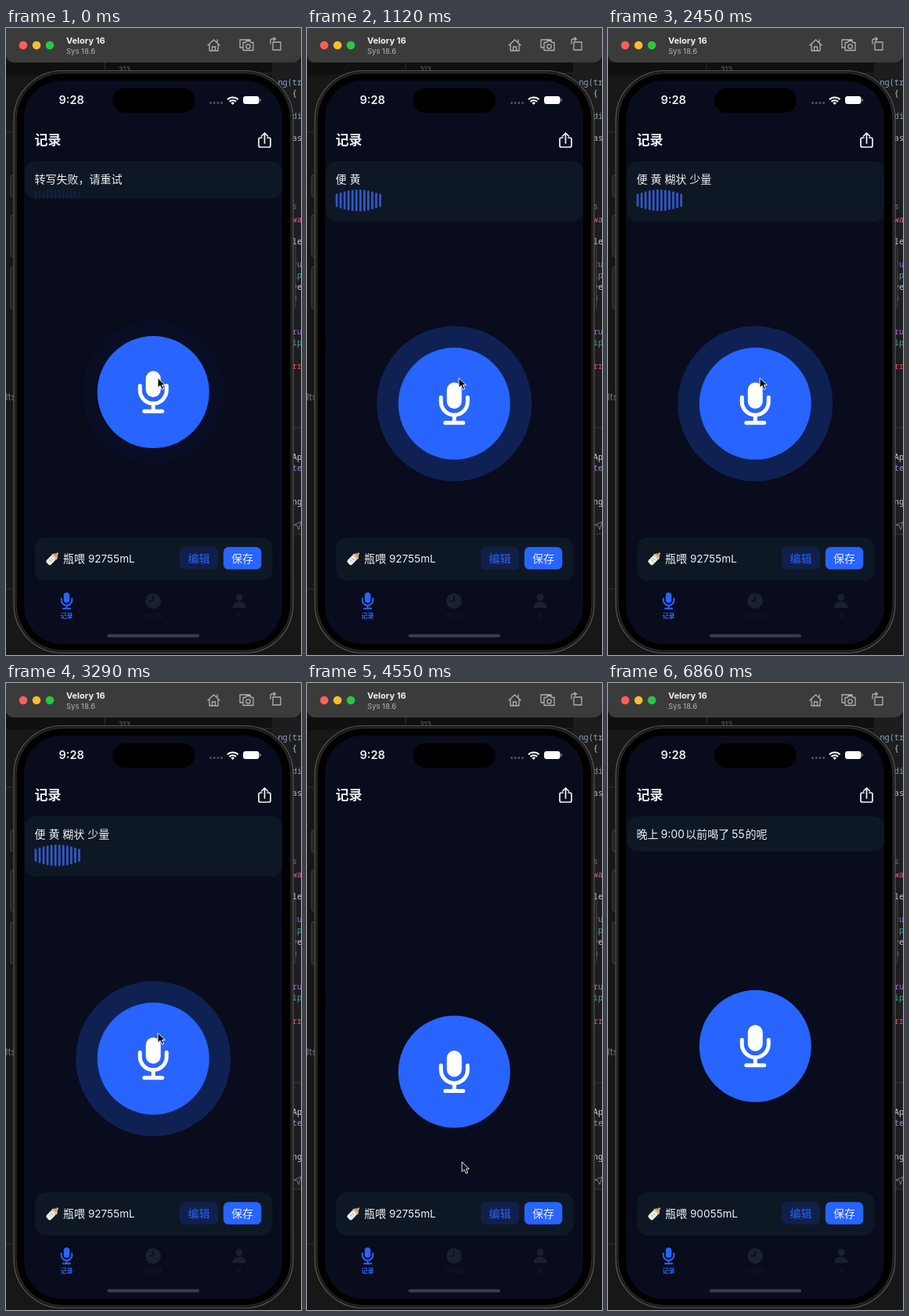
An HTML page that plays this animation: 377 by 800 pixels, repeating every 7000 ms.

```html
<!DOCTYPE html>
<html lang="zh-CN">
<head>
<meta charset="utf-8">
<style>
html, body { margin: 0; width: 100%; height: 100%; overflow: hidden; background: #171717; }
svg { display: block; width: 100vw; height: 100vh; }
text { font-family: Inter, "Noto Sans CJK SC", "Noto Sans CJK", sans-serif; fill: #eef0f5; font-size: 14px; white-space: pre; }
.mid { text-anchor: middle; }
.small { font-size: 8px; }
.amount { font-size: 13.5px; }
#code text { font: 500 10.2px "Noto Sans Mono", monospace; }
.line { fill: none; stroke-linecap: round; stroke-linejoin: round; }
</style>
</head>
<body>
<svg viewBox="0 0 377 800">
  <defs>
    <g id="mic">
      <rect x="-9.5" y="-27" width="19" height="33.5" rx="9.5" stroke="none"/>
      <path class="line" stroke-width="5" d="M-17-8v5.5a17 17 0 0 0 34 0v-5.5M0 15v9M-11.5 24.5h23"/>
    </g>
    <clipPath id="cardClip"><rect id="clipBox" x="23" y="170" width="330" height="48"/></clipPath>
  </defs>

  <!-- desktop -->
  <rect width="377" height="800" fill="#171717"/>
  <rect y="44" width="377" height="16" fill="#101010"/>
  <path d="M126 44v14H377M0 133h12M0 716h12" fill="none" stroke="#303030"/>
  <rect x="340" y="44" width="37" height="602" fill="#1d1d20"/>
  <path d="M350 510h27M350 646h27" stroke="#39393c"/>
  <path class="line" d="M368 634l9-4-3 10-2-5z" stroke="#77777b"/>
  <text x="144" y="56" style="font-size:9px;fill:#66666a">313</text>
  <text x="-.5" y="475" style="font-size:12px;fill:#77777a">lts</text>
  <g id="code"></g>

  <!-- window bar -->
  <path d="M0 0H377V34a10 10 0 0 1-10 10H10A10 10 0 0 1 0 34z" fill="#3b3b3c"/>
  <circle cx="22" cy="22" r="5.3" fill="#ff5f57"/>
  <circle cx="39" cy="22" r="5.3" fill="#febc2e"/>
  <circle cx="56" cy="22" r="5.3" fill="#28c840"/>
  <text x="77" y="20" style="font-size:11px;font-weight:700">Velory 16</text>
  <text x="77" y="33" style="font-size:9.5px;fill:#b1b1b3">Sys 18.6</text>
  <g class="line" stroke="#b0b0b2" stroke-width="1.3">
    <path d="M258 22l7.5-7 7.500 7M260 21v8h11v-8M263.500 29v-5h4v5M270 18v-3"/>
    <path d="M302 25h-3v-10h13v2M303 18.500h3l1.500-2h4l1.500 2h3v10h-13z"/>
    <circle cx="309.5" cy="23.5" r="2.7"/>
    <path d="M341 18h10v10h-10zM338 20v-4q0-2 2-2h4M342 12l2.500 2-2.500 2"/>
  </g>

  <!-- phone body -->
  <g fill="#202020" stroke="#454545">
    <rect x="6" y="188" width="6" height="27" rx="1.5"/>
    <rect x="6" y="239" width="6" height="52" rx="1.5"/>
    <rect x="6" y="305" width="6" height="53" rx="1.5"/>
    <rect x="364" y="277" width="6" height="80" rx="1.5"/>
  </g>
  <rect x="10" y="54.5" width="357" height="743" rx="62" fill="#1b1b1c" stroke="#565656" stroke-width="1.2"/>
  <rect x="13" y="57.5" width="351" height="737" rx="59" fill="#000" stroke="#303030"/>
  <rect x="23" y="67" width="330" height="719" rx="48" fill="#080c1c"/>

  <!-- status bar -->
  <rect x="136" y="77" width="105" height="31" rx="15.5"/>
  <text x="67.5" y="97.3" style="font-size:14.5px;font-weight:600">9:28</text>
  <path d="M261.500 95.500h16" class="line" stroke="#50535f" stroke-width="3" stroke-dasharray="0 4.7"/>
  <path d="M283 91.300a9.500 9.500 0 0 1 13.500 0M285.500 94a6 6 0 0 1 8.500 0" fill="none" stroke="#fff" stroke-width="2.2"/>
  <path d="M289.700 98l-2.300-2.500a3.500 3.500 0 0 1 4.600 0z" fill="#fff"/>
  <rect x="303" y="87" width="20.5" height="10" rx="3.3" fill="#fff"/>
  <path d="M325 90.500q1.500 1.500 0 3z" fill="#888" stroke="#888"/>

  <!-- header -->
  <text x="36.5" y="149" style="font-size:17px;font-weight:700">记录</text>
  <path class="line" stroke="#f2f4f8" stroke-width="1.7" d="M327 140h-2q-2 0-2 2v8q0 2 2 2h11q2 0 2-2v-8q0-2-2-2h-2M330.500 147v-12M326.500 138l4-4 4 4"/>

  <!-- transcript card -->
  <g id="card">
    <rect id="cardBox" x="24" y="170" width="329" height="48" rx="14" fill="#0e1825"/>
    <text id="speech" x="36.5" y="198"></text>
    <g clip-path="url(#cardClip)"><g id="bars" fill="#3158cc"></g></g>
  </g>

  <!-- record button -->
  <g id="button">
    <circle id="halo" r="99" fill="#0e2152"/>
    <circle r="71.5" fill="#2864ff"/>
    <use href="#mic" fill="#fff" stroke="#fff"/>
  </g>

  <!-- pending entry -->
  <rect x="37" y="650" width="303.5" height="55" rx="14" fill="#0e1825"/>
  <g transform="translate(59.5 677) rotate(45)">
    <rect x="-4" y="-3" width="8" height="12" rx="2.5" fill="#f1efe8"/>
    <path d="M-2 1h4M-2 4h4" stroke="#aab1b8"/>
    <rect x="-4.5" y="-5" width="9" height="3" rx="1" fill="#dfc9a0"/>
    <path d="M-3.500-5q0-2 2.200-2.500v-2q1.300-1.500 2.600 0v2q2.200.5 2.200 2.500z" fill="#d9a76c"/>
  </g>
  <text x="73" y="682.3">瓶喂</text>
  <text id="oldAmount" class="amount" x="105" y="682.3">92755mL</text>
  <text id="newAmount" class="amount" x="105" y="682.3">90055mL</text>
  <rect x="222" y="662.3" width="49" height="28.5" rx="6.5" fill="#10204a"/>
  <text class="mid" x="246.5" y="682.3" style="fill:#2b62f6">编辑</text>
  <rect x="277.8" y="662.3" width="48.5" height="28.5" rx="6.5" fill="#2864ff"/>
  <text class="mid" x="302" y="682.3" style="font-weight:500">保存</text>

  <!-- tab bar -->
  <use href="#mic" transform="translate(77.5 731) scale(.4)" fill="#2864ff" stroke="#2864ff"/>
  <text class="mid small" x="77.5" y="752.5" style="fill:#2864ff;font-weight:600">记录</text>
  <g fill="#1a2030">
    <circle cx="188" cy="731" r="10"/>
    <path d="M188 725v6h-4.500" class="line" stroke="#090d1c" stroke-width="1.5"/>
    <circle cx="298" cy="726.5" r="4.5"/>
    <path d="M289.500 740q0-8 8.500-8t8.500 8z"/>
  </g>
  <text class="mid small" x="188" y="752.5" style="fill:#151b2a">时间线</text>
  <text class="mid small" x="298" y="752.5" style="fill:#151b2a">我</text>
  <rect x="129.5" y="773.5" width="117.5" height="4" rx="2" fill="#3a3d48"/>

  <path id="cursor" d="M0 0v12.500l3-2.700 2.300 5 2.200-1-2.200-4.800h4z" fill="#080808" stroke="#f4f4f4"/>
</svg>
<script>
const LOOP = 7000, BAR_COUNT = 12;
const $ = id => document.getElementById(id);
const set = (el, attrs) => { for (const k in attrs) el.setAttribute(k, attrs[k]); };
const make = (tag, parent, attrs) => {
  const el = document.createElementNS('http://www.w3.org/2000/svg', tag);
  set(el, attrs);
  return parent.appendChild(el);
};
const mix = (a, b, p) => a + (b - a) * p;
const ramp = (t, start, end) => {
  const p = Math.min(1, Math.max(0, (t - start) / (end - start)));
  return p * p * (3 - 2 * p);
};

// Editor text peeking out beside the phone
const snippets = [
  [73, 'ng(tr', '#8ea6bd'], [87, '   { s', '#c8c8cc'], [116, '   di', '#8799a8'], [144, '   ast', '#b8b8bc'],
  [231, "   s '", '#77777c'], [248, '   wa', '#e0609c'], [276, '   le', '#c8c8cc'], [305, '   ru', '#9b6cc0'],
  [319, '   ip', '#4f9d94'], [334, '   ve', '#c8c8cc'], [348, '   n ', '#9b7fc8'], [391, '   ru', '#a06cc8'],
  [405, '   ip', '#4f9d94'], [435, '   rro', '#e05252'], [551, '   Ap', '#d4d4d8'], [565, '   te', '#9b87c8'],
  [608, '   ng', '#c8c8cc']
];
for (const [y, words, fill] of snippets)
  make('text', $('code'), { x: 347.5, y, style: `fill:${fill}` }).textContent = words;

const bars = Array.from({ length: BAR_COUNT }, (_, i) =>
  make('rect', $('bars'), { x: 36.6 + i * 5.05, width: 2.7, rx: 1.3 }));

const captions = [
  [0, '转写失败，请重试'], [140, '正在聆听...'], [910, '便'], [1050, '便 黄'],
  [1260, '便 黄 糊状'], [1470, '便 黄 糊状 少量'],
  [5040, '晚上<tspan dx="3">9:00</tspan><tspan dx="1">以前喝了</tspan><tspan dx="3">55</tspan><tspan dx="1">的呢</tspan>']
];
let shownCaption = '';

function draw(t) {
  const second = t >= 5040;
  const listening = ramp(t, -100, 320) * (1 - ramp(t, 3920, 4200));
  const shown = second ? ramp(t, 5040, 5320) : 1 - ramp(t, 3920, 4340);
  const bottom = second ? 215 : 215 + 27 * ramp(t, -90, 380) + 5 * ramp(t, 840, 1120);
  const buttonY = mix(496, 355.8 + bottom / 2, shown);

  set($('card'), { opacity: shown });
  set($('cardBox'), { height: bottom - 170 });
  set($('clipBox'), { height: bottom - 170 });
  const caption = captions.filter(([start]) => t >= start).pop()[1];
  if (caption !== shownCaption) $('speech').innerHTML = shownCaption = caption;

  const level = Math.max(12, bottom - 219.3 + 0.5 * Math.sin(t / 130));
  set($('bars'), { opacity: listening });
  bars.forEach((bar, i) => {
    const height = level * (0.6 + 0.4 * Math.sin(Math.PI * i / (BAR_COUNT - 1)));
    set(bar, { y: 206 + (level - height) / 2, height });
  });

  set($('button'), { transform: `translate(188.2 ${buttonY})` });
  set($('halo'), { opacity: listening, r: mix(90, 99, listening) });

  const changed = ramp(t, 5440, 5620);
  set($('oldAmount'), { opacity: 1 - changed });
  set($('newAmount'), { opacity: changed });

  const down = ramp(t, 4060, 4480), up = ramp(t, 4620, 4900);
  const x = 194 + 4 * down + 22 * up;
  const y = 446.5 + 164.5 * down - 101.5 * up;
  set($('cursor'), { transform: `translate(${x} ${y})`, opacity: t < 5950 ? 1 : 0 });
}

const began = performance.now();
function frame() {
  draw((performance.now() - began) % LOOP);
  requestAnimationFrame(frame);
}
frame();
</script>
</body>
</html>
```
